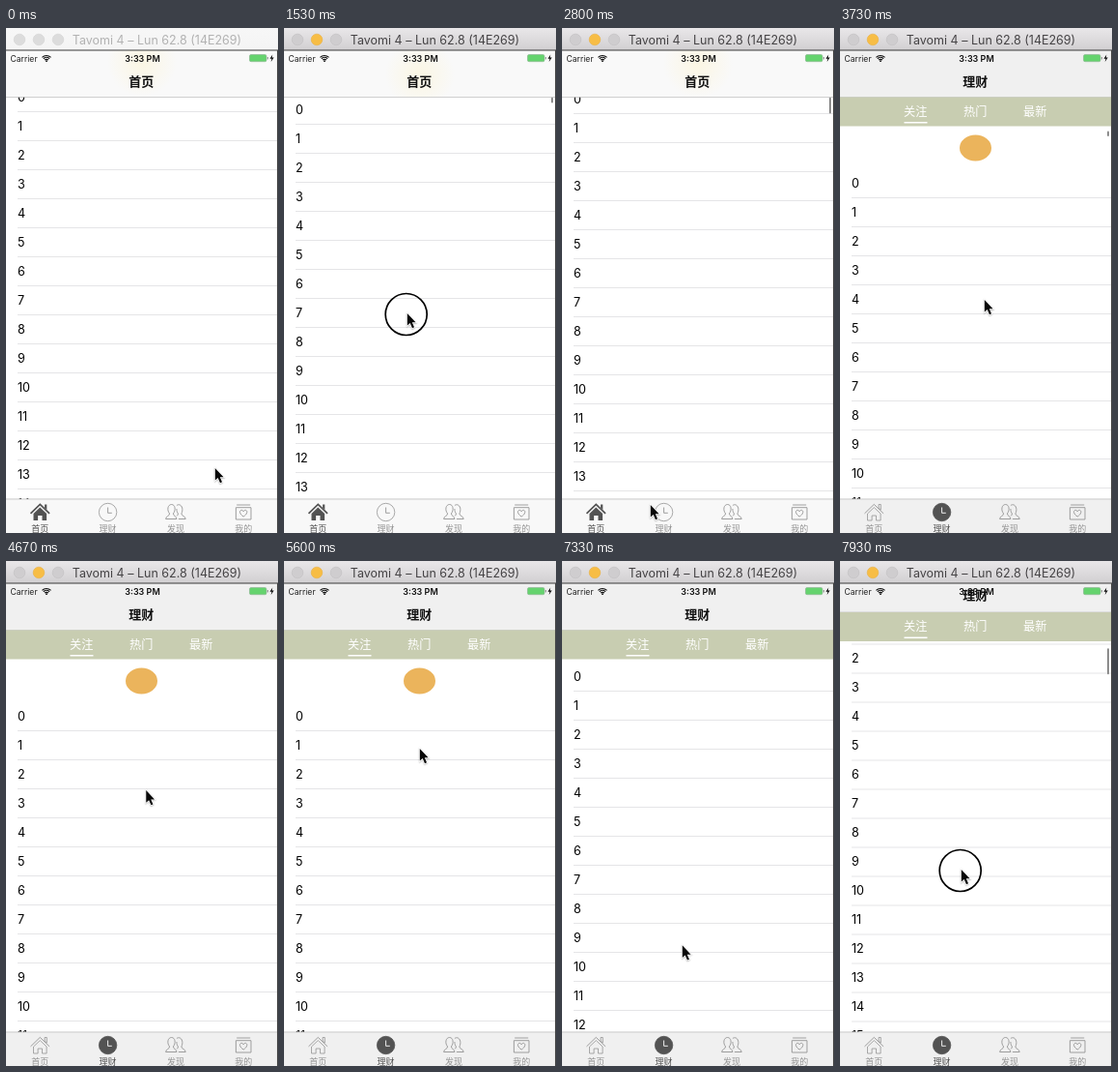
These frames come from a looping animation (282x522 px, 8000 ms). An HTML page with a canvas:

```html
<!DOCTYPE html>
<html lang="zh">
<head>
<meta charset="utf-8">
<style>
  html, body { margin: 0; width: 100%; height: 100%; overflow: hidden; background: #fff; }
  canvas { display: block; width: 282px; height: 522px; }
</style>
</head>
<body>
<canvas id="stage"></canvas>
<script>
const W = 282, H = 522, LOOP = 8000;
const ROW = 30, TITLE_H = 23, TAB_TOP = 487, NAV_BOTTOM = 71, STRIP_BOTTOM = 101.5;
const LATIN = 'Inter, "Noto Sans CJK SC", sans-serif';
const CJK = '"Noto Sans CJK SC", "Noto Sans CJK", sans-serif';

const canvas = document.getElementById('stage');
const ctx = canvas.getContext('2d');
const ratio = window.devicePixelRatio || 1;
canvas.width = W * ratio;
canvas.height = H * ratio;

// Keyframes: [time, value, ...]
const CURSOR = [
  [70, 216, 455], [670, 75, 22], [870, 75, 22], [1300, 125, 268],
  [1530, 127, 295], [2050, 129, 345], [2200, 129, 345], [2800, 91, 493],
  [3000, 100, 500], [3450, 100, 500], [3730, 149, 281], [5600, 140, 194],
  [5950, 140, 194], [6400, 123, 380], [6800, 123, 380], [7400, 124, 398],
  [7930, 125, 319], [8000, 125, 312]
];
const HOME_SCROLL = [[1300, 13], [1530, 0], [2050, -22], [2200, -22], [2800, 11], [3000, 13]];
const FINANCE_SCROLL = [[3200, 0], [3500, -41], [5850, -41], [6200, 0], [7450, 0], [7930, 78.5], [8000, 84]];
const PRESSES = [[620, 870], [1300, 2150], [3100, 3300], [7450, 8000]];
const HOME_BAR = [[1300, 0], [1400, 1], [2900, 1], [3100, 0]];
const FINANCE_BAR = [[3200, 0], [3300, 1], [4000, 1], [4300, 0], [7450, 0], [7550, 1]];
const ACTIVATE = 870, SWITCH = 3200;

const clamp = (v, lo, hi) => Math.min(hi, Math.max(lo, v));

function track(keys, t) {
  const next = keys.findIndex(k => k[0] > t);
  if (next === 0) return keys[0].slice(1);
  if (next < 0) return keys[keys.length - 1].slice(1);
  const a = keys[next - 1], b = keys[next];
  const p = (t - a[0]) / (b[0] - a[0]);
  const e = p * p * (3 - 2 * p);
  return a.slice(1).map((v, i) => v + (b[i + 1] - v) * e);
}

function rect(x, y, w, h, color) {
  ctx.fillStyle = color;
  ctx.fillRect(x, y, w, h);
}

// y is the optical centre of the glyphs
function text(str, x, y, size, color, { weight = 400, align = 'center', font = LATIN } = {}) {
  ctx.font = `${weight} ${size}px ${font}`;
  ctx.textAlign = align;
  ctx.fillStyle = color;
  ctx.fillText(str, x, y + size * 0.37);
}

// Fills and strokes an SVG path, or the current path when d is null
function paint(d, fill, stroke, width = 1) {
  const args = d ? [new Path2D(d)] : [];
  if (fill) { ctx.fillStyle = fill; ctx.fill(...args); }
  if (stroke) { ctx.strokeStyle = stroke; ctx.lineWidth = width; ctx.stroke(...args); }
}

function disc(x, y, r, fill, stroke, width) {
  ctx.beginPath();
  ctx.arc(x, y, r, 0, Math.PI * 2);
  paint(null, fill, stroke, width);
}

function at(x, y, draw) {
  ctx.save();
  ctx.translate(x, y);
  draw();
  ctx.restore();
}

function titleBar(active) {
  const shade = ctx.createLinearGradient(0, 0, 0, TITLE_H);
  shade.addColorStop(0, active ? '#e9e7e9' : '#f7f7f7');
  shade.addColorStop(1, active ? '#d1cfd1' : '#f4f4f4');
  rect(0, 0, W, TITLE_H, shade);
  const gray = active ? '#cfcdcf' : '#dcdcdc', edge = active ? '#c2c0c2' : '#d4d4d4';
  [gray, active ? '#f7bd45' : gray, gray].forEach((color, i) =>
    disc(14 + i * 20, 12, 5.8, color, i === 1 && active ? '#eab040' : edge, 0.6));
  text('Tavomi 4 – Lun 62.8 (14E269)', 156.5, 12.5, 12.5, active ? '#454345' : '#b2b2b2');
  rect(0, TITLE_H - 0.5, W, 1, '#3c3c3c');
}

function statusBar() {
  text('Carrier', 4.5, 31.5, 8.6, '#222', { align: 'left' });
  for (const r of [2.4, 4.3, 6.2]) {
    ctx.beginPath();
    ctx.arc(42, 34.7, r, -Math.PI * 0.76, -Math.PI * 0.24);
    paint(null, null, '#111', 1.2);
  }
  disc(42, 34.2, 0.9, '#111');
  text('3:33 PM', 141.5, 31.3, 9, '#111', { weight: 600 });
  ctx.beginPath();
  ctx.roundRect(252.5, 27.5, 17.5, 7.2, 1.5);
  paint(null, '#65d36e', '#8fb894', 0.7);
  rect(270.8, 30, 1, 2.4, '#888');
  paint('M276.3 27.5 L273.5 31.8 H275.5 L274.7 35 L277.8 30.6 H275.8 Z', '#111');
}

function list(origin, top) {
  ctx.save();
  ctx.beginPath();
  ctx.rect(0, top, W, TAB_TOP - top);
  ctx.clip();
  ctx.beginPath();
  ctx.ellipse(140.5, origin - 21.5, 16.5, 13.5, 0, 0, Math.PI * 2);
  paint(null, '#ebb45c');
  for (let i = 0; i < 20; i++) {
    const y = origin + i * ROW;
    text(String(i), 12, y + 14.7, 12.6, '#000', { align: 'left' });
    rect(12, y + ROW - 0.5, W - 12, 1, '#e5e5e7');
  }
  ctx.restore();
}

function scrollBar(y, length, alpha) {
  ctx.globalAlpha = alpha;
  ctx.beginPath();
  ctx.roundRect(277, y, 2, length, 1);
  paint(null, '#8c8c8c');
  ctx.globalAlpha = 1;
}

function navBar(title, color, shift, glowY) {
  const bottom = NAV_BOTTOM - shift;
  rect(0, TITLE_H, W, bottom - TITLE_H, color);
  if (glowY !== undefined) {
    const glow = ctx.createRadialGradient(141, glowY, 4, 141, glowY, 36);
    glow.addColorStop(0, 'rgba(251,246,226,.85)');
    glow.addColorStop(1, 'rgba(251,246,226,0)');
    rect(100, TITLE_H, 82, bottom - TITLE_H, glow);
  }
  rect(0, bottom, W, 0.8, '#c4c4c4');
  statusBar();
  text(title, 140.3, 55.3 - shift * 1.08, 13, '#111', { weight: 700, font: CJK });
}

function strip(shift) {
  const y = NAV_BOTTOM - shift;
  rect(0, y + 0.5, W, STRIP_BOTTOM - NAV_BOTTOM - 0.5, '#c8cdb1');
  ['关注', '热门', '最新'].forEach((label, i) =>
    text(label, 78.3 + i * 62, y + 15.4, 12.2, '#fff', { font: CJK }));
  rect(66.5, y + 26, 24, 1.5, '#fff');
}

const ICONS = [
  (on, c) => {
    paint('M-6.8 2 V9 H-2.2 V4 H2.2 V9 H6.8 V2 L0 -4.4 Z', on && c, on ? null : c, 0.8);
    paint('M-9.8 1.8 L0 -7.6 L9.8 1.8', null, c, on ? 1.7 : 0.9);
    paint('M4.8 -7.5 H7 V-2 L4.8 -4 Z', on && c, on ? null : c, 0.8);
  },
  (on, c) => {
    disc(0, 0.5, 9.2, on && c, c, 0.8);
    paint('M0 -4.5 V1.3 H4.2', null, on ? '#fff' : c, 0.9);
  },
  (on, c) => {
    paint('M-10.3 7.5 C-10.3 4.5 -6.3 4.5 -6.3 2 C-9.5 -2 -8 -7.5 -4.3 -7.5 C-.6 -7.5 .5 -2 -2.5 2 C-2.5 4.5 1 4.5 1 7.5 Z', null, c, 0.9);
    paint('M1 -6.5 C5 -9.3 8.8 -4 6 2 C6 4.5 10.3 4.5 10.3 7.5 H3 M1 -3 C1 -1 1.5 .5 2.5 2 C2.5 3.5 1.5 4 1 4.5', null, c, 0.9);
  },
  (on, c) => {
    paint('M-7.8 -4.3 H7.8 V8 H-7.8 Z M-7 -7 H7', null, c, 0.9);
    paint('M0 5 C-5.5 1.5 -3.8 -2.2 -1.5 -1.6 Q-.4 -1.3 0 -.2 Q.4 -1.3 1.5 -1.6 C3.8 -2.2 5.5 1.5 0 5 Z', null, c, 0.9);
  }
];

function tabBar(selected, color) {
  rect(0, TAB_TOP, W, H - TAB_TOP, color);
  rect(0, TAB_TOP - 0.5, W, 0.9, '#c4c4c4');
  ['首页', '理财', '发现', '我的'].forEach((label, i) => {
    const x = 35.3 + i * 70.3, on = i === selected;
    const ink = on ? '#535353' : '#959595';
    at(x, 500, () => ICONS[i](on, ink));
    text(label, x, 518, 9, ink, { weight: on ? 500 : 400, font: CJK });
  });
}

function pointer(x, y, pressed) {
  if (pressed) disc(x - 0.3, y + 1, 21.5, null, '#000', 1.7);
  at(x + 0.8, y, () => {
    ctx.shadowColor = 'rgba(0,0,0,.3)';
    ctx.shadowBlur = 1.5 * ratio;
    ctx.shadowOffsetY = 0.7 * ratio;
    const arrow = 'M0 0 V12.6 L2.9 10.1 L5.2 15.2 L7.2 14.3 L5 9.3 H8.8 Z';
    paint(arrow, null, '#fff', 1.5);
    ctx.shadowColor = 'transparent';
    paint(arrow, '#080808');
  });
}

function homePage(t) {
  const [scroll] = track(HOME_SCROLL, t), [alpha] = track(HOME_BAR, t);
  const origin = 69.5 - scroll;
  list(origin, NAV_BOTTOM);
  scrollBar(71.5, clamp(6 + scroll, 6, 27), alpha);
  navBar('首页', '#f9f9f9', 0, origin - 21.5);
  tabBar(0, '#f8f8f8');
}

function financePage(t) {
  const [scroll] = track(FINANCE_SCROLL, t), [alpha] = track(FINANCE_BAR, t);
  const shift = clamp((scroll - 20) / 58.5, 0, 1) * 18.5;
  const top = STRIP_BOTTOM - shift;
  list(104.5 - scroll, top);
  scrollBar(top + 5 + Math.max(0, scroll) * 0.03, clamp(27 + scroll, 5.5, 27), alpha);
  navBar('理财', '#f0f0f0', shift);
  strip(shift);
  tabBar(1, '#f0f0f0');
}

function draw(t) {
  ctx.setTransform(ratio, 0, 0, ratio, 0, 0);
  rect(0, 0, W, H, '#fff');
  (t < SWITCH ? homePage : financePage)(t);
  titleBar(t >= ACTIVATE);
  rect(281, TITLE_H, 1, H - TITLE_H, '#4a4a4a');
  const [x, y] = track(CURSOR, t);
  pointer(x, y, PRESSES.some(([from, to]) => t >= from && t < to));
}

const start = performance.now();
function tick() {
  draw((performance.now() - start) % LOOP);
  requestAnimationFrame(tick);
}
tick();
</script>
</body>
</html>
```
